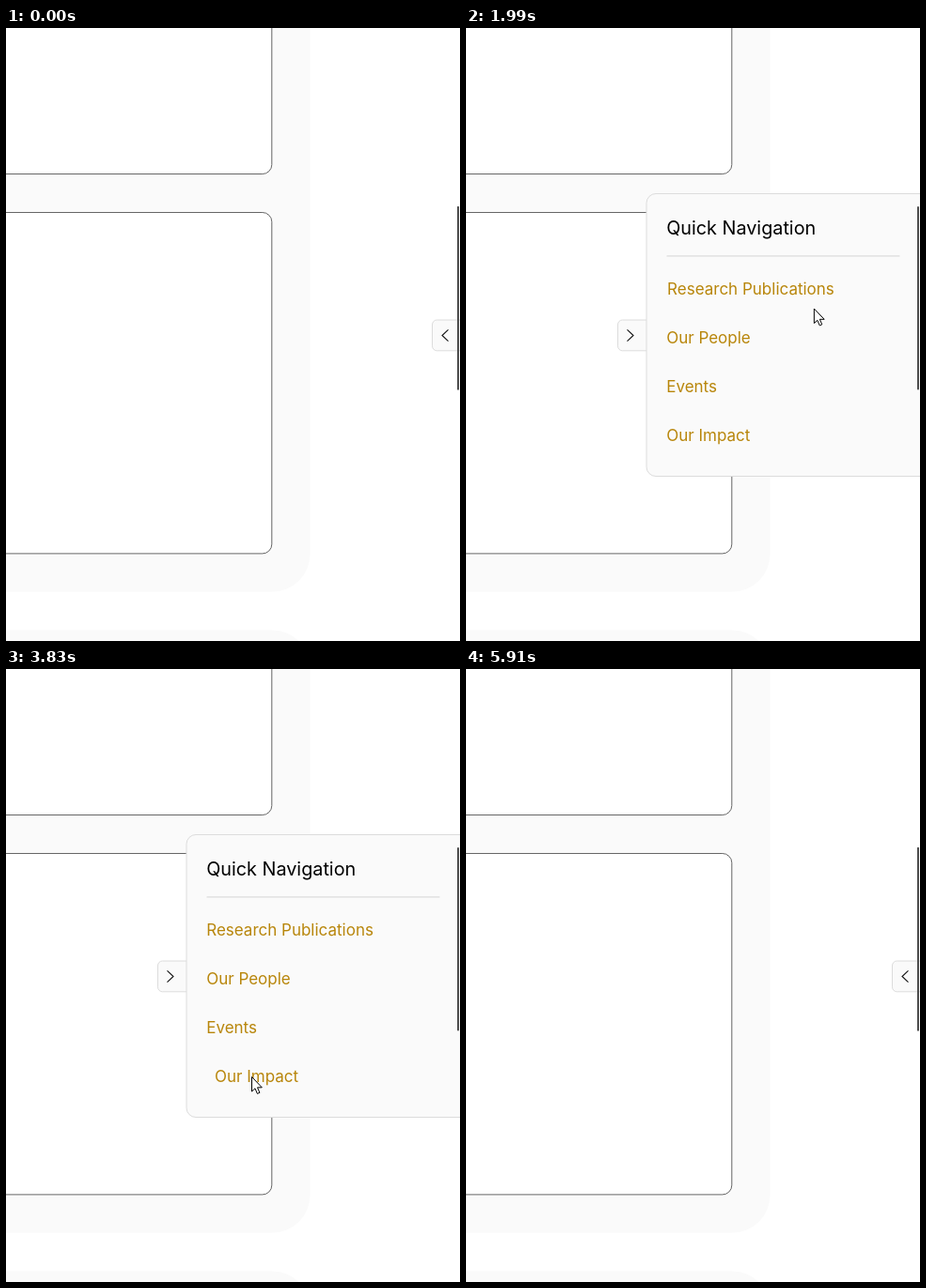
Recreate the animation shown at these times as an HTML page. Size 483 by 653 pixels, loop 6.28 s.

```html
<!DOCTYPE html>
<html lang="en">
<head>
<meta charset="utf-8">
<title>Quick Navigation drawer</title>
<style>
  html, body { margin: 0; width: 100%; height: 100%; overflow: hidden; background: #fff; }
  svg { display: block; width: 483px; height: 653px; }
  text { font-family: Inter, "Open Sans", sans-serif; }
  .section { fill: #fafafa; }
  .card { fill: #fff; stroke: #555; stroke-width: .9; }
  .surface { fill: #fafafa; stroke: #dcdcdc; }
  .title { font-size: 19.8px; fill: #000; }
  .link { font-size: 17px; fill: #b8860b; }
  .chevron { fill: none; stroke: #111; stroke-width: 1.1; }
  .thumb { fill: #4c4c4c; }
  .pointer { stroke: #000; stroke-linejoin: round; }
</style>
</head>
<body>
<svg viewBox="0 0 483 653">
  <rect class="section" x="-100" y="-100" width="423.5" height="700.5" rx="40"/>
  <rect class="section" x="-100" y="641.5" width="423.5" height="200" rx="40"/>
  <rect class="card" x="-50" y="-50" width="332.8" height="205.5" rx="10"/>
  <rect class="card" x="-50" y="196.5" width="332.8" height="363.4" rx="10"/>

  <rect class="thumb" x="480" y="190" width="2" height="195.5" rx="1"/>
  <g id="drawer">
    <rect class="surface" x="161.5" y="311" width="45" height="32.8" rx="5"/>
    <path class="chevron" id="chevron"/>
    <path class="surface" d="M484 176.5H202a10 10 0 0 0-10 10V467.5a10 10 0 0 0 10 10H484"/>
    <text class="title" x="213.2" y="220">Quick Navigation</text>
    <rect x="213.5" y="242.3" width="248" height="1.2" fill="#dcdcdc"/>
    <g id="links"></g>
  </g>
  <rect class="thumb" id="topThumb" x="480" y="190" width="2" height="195.5" rx="1"/>

  <g id="cursor">
    <path class="pointer" id="arrow" fill="#fff"
      d="M.5 .5V16L4 12.8 6.4 18.4 8.9 17.3 6.5 11.8H11.3Z"/>
    <path class="pointer" id="hand" fill="#e6e6e6" stroke-width="1.3"
      d="M-.9 10 -1.3 2Q-1.2.5 .2.5T1.8 2L2.3 6.4Q2.6 5 3.9 5.2T5.4 6.9Q5.9 5.7 7.2 6.1T8.5 7.7Q9.8 6.9 10.6 8.1 11.1 10.5 10.4 13.2 9.5 15.8 8.4 18H.3Q-.5 15.8-2.5 13.5-4.8 10.8-4.2 9.6-3.3 8.3-.9 10.6Z"/>
  </g>
</svg>
<script>
const LOOP = 6280, OPEN = 1070, CLOSE = 4940, SLIDE = 500;
const TRAVEL = 292, NUDGE = 8.8, HOVER = 200;

const $ = id => document.getElementById(id);
const clamp = p => Math.min(1, Math.max(0, p));
const smooth = p => p * p * (3 - 2 * p);
const settle = p => 1 - (1 - p) ** 1.3;

// The CSS "ease" curve, cubic-bezier(.25, .1, .25, 1)
function ease(p) {
  p = clamp(p);
  let lo = 0, hi = 1;
  for (let i = 0; i < 20; i++) {
    const s = (lo + hi) / 2;
    if (.75 * s * (1 - s) + s ** 3 < p) lo = s; else hi = s;
  }
  return .3 * lo * (1 - lo) ** 2 + 3 * lo * lo * (1 - lo) + lo ** 3;
}

// Labels with their hover spans [enter, leave]
const items = [
  ["Research Publications", [[1970, 2445]]],
  ["Our People", [[2580, 3110]]],
  ["Events", [[3130, 3620], [4243, 4330]]],
  ["Our Impact", [[3640, 4120]]],
].map(([label, spans], i) => {
  const el = document.createElementNS("http://www.w3.org/2000/svg", "text");
  el.setAttribute("class", "link");
  el.setAttribute("x", 213.2);
  el.setAttribute("y", 284 + 52 * i);
  el.textContent = label;
  $("links").append(el);
  return { el, spans };
});

// Pointer moves: start, end, easing, end point, optional control point
const moves = [
  [300, 940, settle, [461, 346], [449, 430]],
  [945, 1030, smooth, [464, 333]],
  [1030, 1110, smooth, [465, 324]],
  [1720, 2170, smooth, [321, 281], [390, 308]],
  [2430, 2800, settle, [295, 338]],
  [3030, 3330, settle, [272, 382]],
  [3560, 3830, settle, [261, 434]],
  [3990, 4600, smooth, [181, 323]],
  [4630, 4710, smooth, [178, 323]],
  [5100, 6000, smooth, [436, 680], [353, 455]],
];

function pointerAt(t) {
  let from = [445, 660];
  for (const [start, end, curve, to, via] of moves) {
    if (t < start) break;
    const s = curve(clamp((t - start) / (end - start)));
    from = from.map((v, k) => {
      const c = via ? via[k] : (v + to[k]) / 2;
      return (1 - s) ** 2 * v + 2 * s * (1 - s) * c + s * s * to[k];
    });
  }
  return from;
}

const nudgeAt = (t, spans) => spans.reduce((sum, [enter, leave]) =>
  sum + NUDGE * ease((Math.min(t, leave) - enter) / HOVER) * (1 - ease((t - leave) / HOVER)), 0);

const move = (el, x, y) => el.setAttribute("transform", `translate(${x.toFixed(2)} ${y.toFixed(2)})`);
const show = (el, on) => el.setAttribute("visibility", on ? "visible" : "hidden");

function draw(t) {
  const shown = ease((t - OPEN) / SLIDE) - ease((t - CLOSE) / SLIDE);
  move($("drawer"), TRAVEL * (1 - shown), 0);

  const isOpen = t >= OPEN && t < CLOSE;
  $("chevron").setAttribute("d", isOpen
    ? "M171.5 321.3L178 327.5 171.5 333.7"
    : "M178.5 321.3L172 327.5 178.5 333.7");

  // A sliding drawer covers the scrollbar
  const sliding = (t >= OPEN && t < 1540) || (t >= CLOSE && t < CLOSE + SLIDE);
  show($("topThumb"), !sliding);

  for (const { el, spans } of items) move(el, nudgeAt(t, spans), 0);

  const [x, y] = pointerAt(t);
  const overTab = (t >= 960 && t < 1095) || (t > 4000 && t < 4970 && x < 192);
  move($("cursor"), x, y);
  show($("hand"), overTab);
  show($("arrow"), !overTab);
}

const begin = performance.now();
function tick() {
  draw((performance.now() - begin) % LOOP);
  requestAnimationFrame(tick);
}
tick();
</script>
</body>
</html>
```
